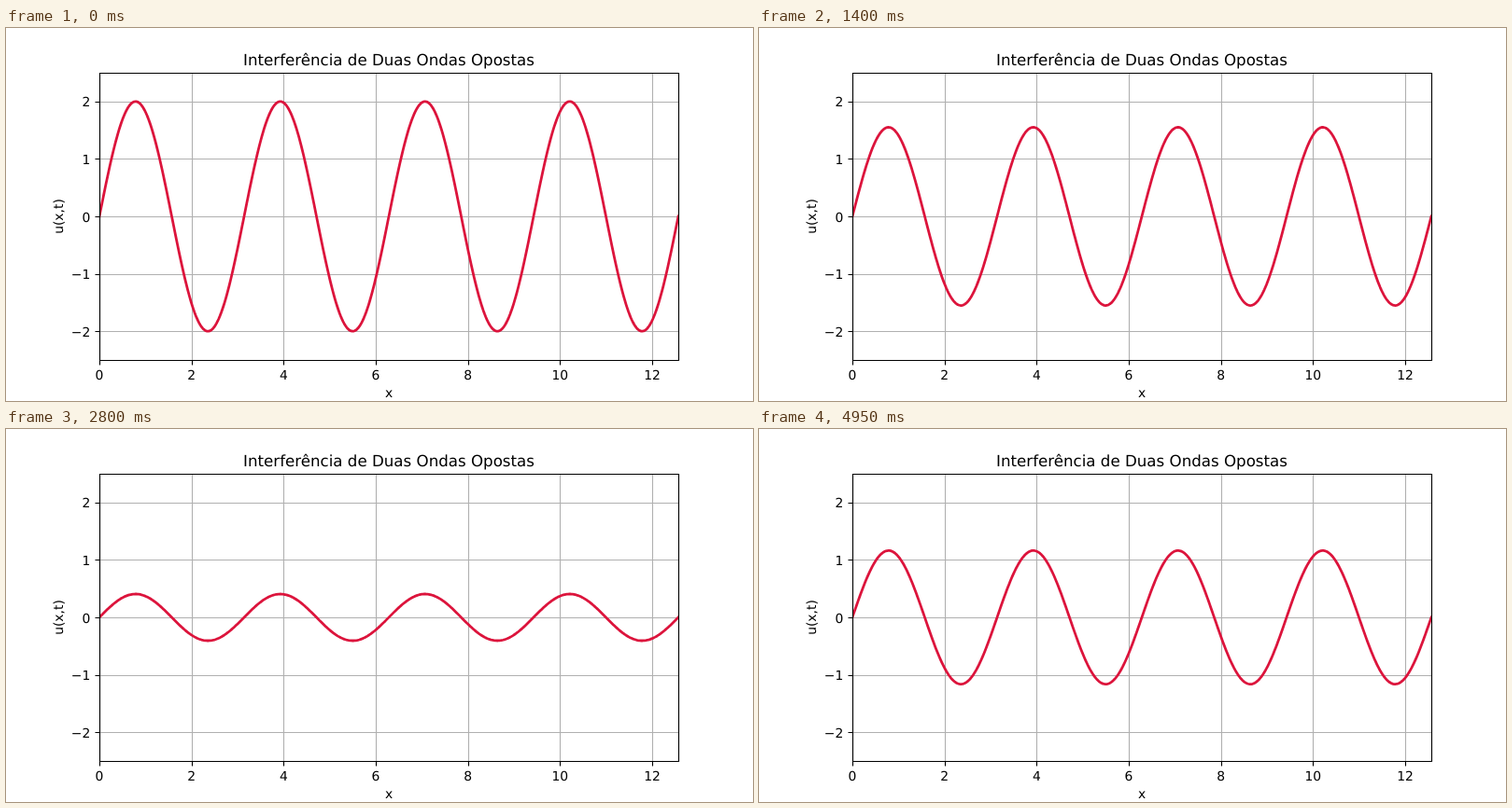
An HTML page that plays this animation: 800 px wide and 400 px high, repeating every 5000 ms.

```html
<!DOCTYPE html>
<html lang="pt">
<head>
<meta charset="utf-8">
<title>Interferência de Duas Ondas Opostas</title>
<style>
  html, body { margin: 0; width: 100%; height: 100%; overflow: hidden; background: #fff; }
  svg { display: block; }
  text { font: 13.889px "DejaVu Sans", sans-serif; text-anchor: middle; text-rendering: geometricPrecision; }
  .title { font-size: 16.667px; }
  .end { text-anchor: end; }
  path { fill: none; stroke: #000; stroke-width: 1.111; }
  #grid { stroke: #b0b0b0; }
  #wave { stroke: #dc143c; stroke-width: 2.778; stroke-linecap: square; stroke-linejoin: round; }
</style>
</head>
<body>
<svg width="800" height="400" viewBox="0 0 800 400">
  <clipPath id="plot"><rect x="100" y="48" width="620" height="308"/></clipPath>
  <g clip-path="url(#plot)">
    <path id="grid"/>
    <path id="wave"/>
  </g>
  <path id="ticks"/>
  <path d="M100.5 48.5H720.5V356.5H100.5Z" stroke-linejoin="miter"/>
  <g id="labels">
    <text class="title" x="410" y="40">Interferência de Duas Ondas Opostas</text>
    <text x="410" y="396">x</text>
    <text transform="translate(61 202) rotate(-90)">u(x,t)</text>
  </g>
</svg>
<script>
const LEFT = 100, WIDTH = 620, MID = 202, UNIT = 61.6;
const SPAN = 4 * Math.PI, POINTS = 500;
const STEP_MS = 50, STEPS = 100, PHASE_STEP = 0.2;

const $ = id => document.getElementById(id);
const toX = x => LEFT + x / SPAN * WIDTH;
const toY = u => MID - u * UNIT;
const snap = v => Math.round(v) + 0.5;

function label(text, x, y, cls = "") {
  const el = document.createElementNS("http://www.w3.org/2000/svg", "text");
  el.setAttribute("x", x);
  el.setAttribute("y", y);
  el.setAttribute("class", cls);
  el.textContent = text;
  $("labels").append(el);
}

function drawAxes() {
  let grid = "", ticks = "";
  for (let x = 0; x <= 12; x += 2) {
    const px = snap(toX(x));
    grid += `M${px} 48V356`;
    ticks += `M${px} 356.5V361.5`;
    label(x, toX(x), 377);
  }
  for (let u = -2; u <= 2; u++) {
    const py = snap(toY(u));
    grid += `M100 ${py}H720`;
    ticks += `M100.5 ${py}H95.5`;
    label(u < 0 ? "\u2212" + -u : u, 90.3, Math.round(toY(u) + 5.5), "end");
  }
  $("grid").setAttribute("d", grid);
  $("ticks").setAttribute("d", ticks);
}

// Two opposite travelling waves add up to a standing wave.
function drawWave(phase) {
  const pts = Array.from({ length: POINTS }, (_, i) => {
    const x = SPAN * i / (POINTS - 1);
    const u = Math.sin(2 * x - phase) + Math.sin(2 * x + phase);
    return `${toX(x).toFixed(2)} ${toY(u).toFixed(2)}`;
  });
  $("wave").setAttribute("d", "M" + pts.join("L"));
}

let start = null, shown = -1;
function tick() {
  const now = performance.now();
  start ??= now;
  const step = Math.floor((now - start) / STEP_MS) % STEPS;
  if (step !== shown) {
    drawWave(step * PHASE_STEP);
    shown = step;
  }
  requestAnimationFrame(tick);
}

drawAxes();
tick();
</script>
</body>
</html>
```
